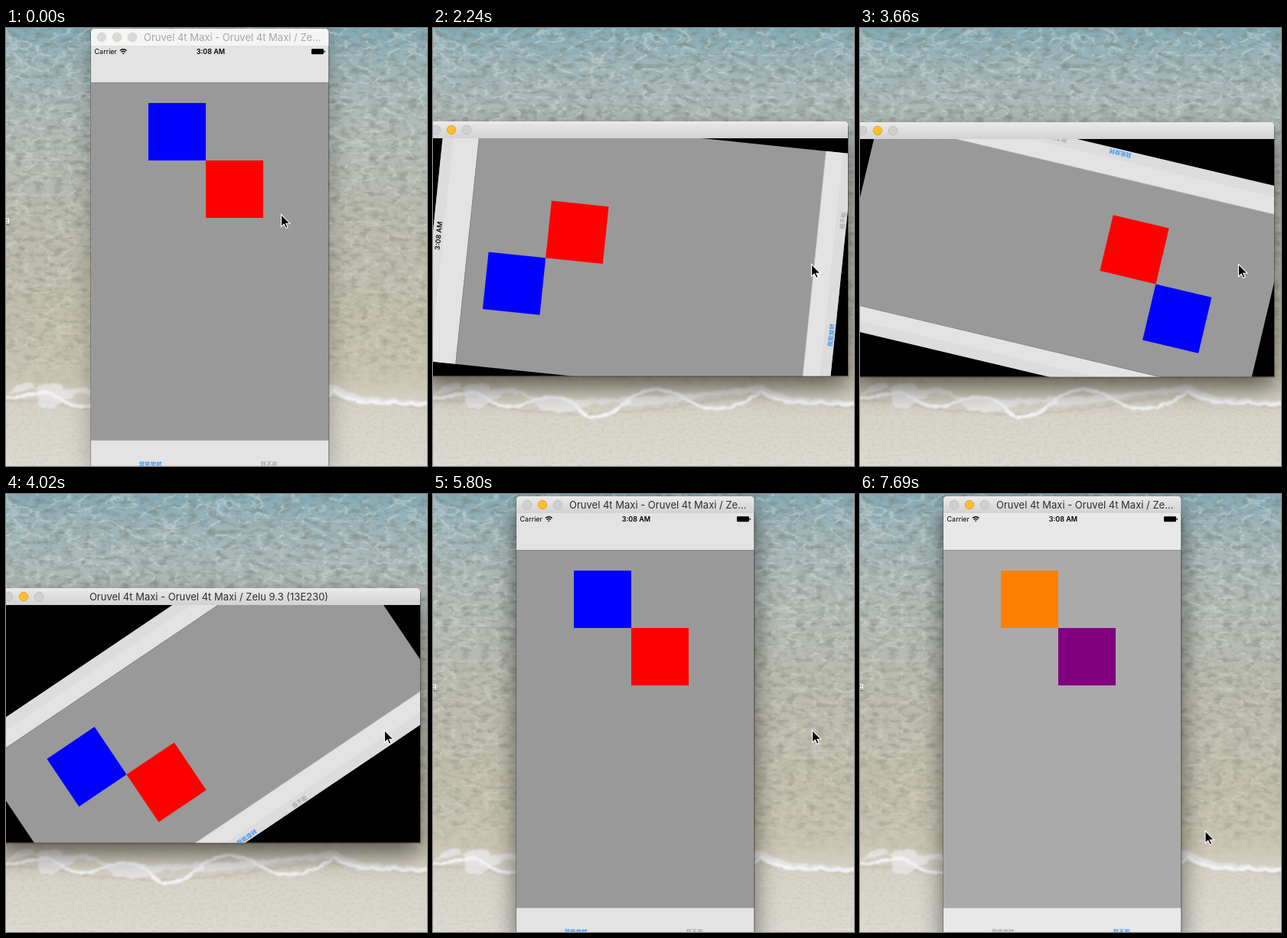
Animation of 550x572 px, one loop 8000 ms. Source, as an HTML page:

```html
<!DOCTYPE html>
<html lang="en">
<head>
<meta charset="utf-8">
<title>Simulator rotation</title>
<style>
  html, body { margin: 0; width: 100%; height: 100%; overflow: hidden; background: #c4c0b0; }
  svg { position: absolute; inset: 0; width: 100%; height: 100%; display: block; }
  #beach { will-change: transform; }
  text { font-family: Inter, "Noto Sans", sans-serif; }
  .status text { font-size: 9px; }
  .tab { font: 7.5px "Noto Sans CJK SC", "Noto Sans CJK", sans-serif; text-anchor: middle; }
</style>
</head>
<body>
<svg id="beach" viewBox="0 0 550 572">
  <defs>
    <linearGradient id="sea" x2="0" y2="1">
      <stop offset="0" stop-color="#84abb7"/>
      <stop offset=".08" stop-color="#9fb6ba"/>
      <stop offset=".2" stop-color="#b0bbb8"/>
      <stop offset=".42" stop-color="#bbbbaf"/>
      <stop offset=".65" stop-color="#c2beab"/>
      <stop offset=".8" stop-color="#cac5b2"/>
      <stop offset=".86" stop-color="#d6d2c6"/>
      <stop offset="1" stop-color="#dcdad2"/>
    </linearGradient>
    <linearGradient id="fade" x2="0" y2="1">
      <stop offset="0" stop-color="#fff"/>
      <stop offset=".35" stop-color="#ccc"/>
      <stop offset=".9" stop-color="#888"/>
      <stop offset="1" stop-color="#000"/>
    </linearGradient>
    <mask id="seaMask"><rect width="550" height="478" fill="url(#fade)"/></mask>
    <filter id="ripple" x="0" y="0" width="1" height="1" color-interpolation-filters="sRGB">
      <feTurbulence type="turbulence" baseFrequency=".036 .055" numOctaves="5" seed="8"/>
      <feColorMatrix values="0 0 0 0 .93  0 0 0 0 .95  0 0 0 0 .94  -3.4 0 0 0 .85"/>
    </filter>
    <filter id="mottle" x="0" y="0" width="1" height="1" color-interpolation-filters="sRGB">
      <feTurbulence type="fractalNoise" baseFrequency=".08 .15" numOctaves="4" seed="3"/>
      <feColorMatrix values="0 0 0 0 .47  0 0 0 0 .5  0 0 0 0 .46  2 0 0 0 -.85"/>
    </filter>
    <filter id="grain" x="0" y="0" width="1" height="1" color-interpolation-filters="sRGB">
      <feTurbulence type="fractalNoise" baseFrequency=".2 .3" numOctaves="2" seed="5"/>
      <feColorMatrix values="0 0 0 0 .6  0 0 0 0 .58  0 0 0 0 .54  1 0 0 0 -.42"/>
    </filter>
    <filter id="rough" x="-.1" y="-.5" width="1.2" height="2">
      <feTurbulence type="fractalNoise" baseFrequency=".08" numOctaves="3" seed="2"/>
      <feDisplacementMap in="SourceGraphic" scale="7" xChannelSelector="R" yChannelSelector="G"/>
      <feGaussianBlur stdDeviation=".9"/>
    </filter>
  </defs>
  <rect width="550" height="572" fill="url(#sea)"/>
  <g mask="url(#seaMask)">
    <rect width="550" height="478" filter="url(#mottle)" opacity=".75"/>
    <rect width="550" height="478" filter="url(#ripple)" opacity=".6"/>
  </g>
  <rect y="484" width="550" height="88" filter="url(#grain)" opacity=".35"/>
  <g filter="url(#rough)" fill="none">
    <path d="M-9 488Q40 484 75 493T190 503T330 492T430 483T560 498" stroke="#b9b2a2" stroke-width="3" opacity=".4"/>
    <path d="M-9 477Q15 478 42 468T75 473Q105 465 118 475T190 484T270 482T330 478T400 470T430 467Q455 482 480 483T560 489V494Q510 492 480 490T430 476Q390 476 330 486T250 491T190 498T130 488T75 488T40 478T-9 484Z" fill="#f0f1f5" fill-opacity=".6"/>
    <path d="M-9 483Q25 483 40 477T75 487T130 487T190 497T250 490T330 485T430 475Q450 489 480 489T560 493" stroke="#f3f4f8" stroke-width="4"/>
  </g>
  <g font-size="11">
    <text x="-1.5" y="255" fill="#000" opacity=".6">g</text>
    <text x="-1.8" y="254" fill="#fff" font-weight="600">g</text>
  </g>
</svg>

<svg id="stage" viewBox="0 0 550 572">
  <defs>
    <filter id="soft" filterUnits="userSpaceOnUse" x="-120" y="-120" width="800" height="860">
      <feGaussianBlur stdDeviation="16"/>
    </filter>
    <linearGradient id="bar" x2="0" y2="1">
      <stop offset="0" stop-color="#ebeaeb"/>
      <stop offset="1" stop-color="#d3d2d3"/>
    </linearGradient>
    <clipPath id="glass"><rect id="glassBox"/></clipPath>
  </defs>
  <rect id="shadow" filter="url(#soft)"/>
  <rect id="frame" fill="none" stroke="#000" stroke-opacity=".35"/>
  <path id="titleBar"/>
  <g id="lights" stroke-width=".8">
    <circle cx="14" cy="11" r="5.8"/><circle cx="34" cy="11" r="5.8"/><circle cx="54" cy="11" r="5.8"/>
  </g>
  <text id="title" font-size="13"></text>
  <g clip-path="url(#glass)">
    <rect id="back"/>
    <g id="ui">
      <rect id="page"/>
      <rect id="boxA" x="75" y="75" width="75" height="75"/>
      <rect id="boxB" x="150" y="150" width="75" height="75"/>
      <rect id="nav"/><rect id="navEdge" fill="#000" opacity=".03"/>
      <rect id="navLine" fill="#777" height=".6"/>
      <rect id="tabs"/><rect id="tabEdge" fill="#000" opacity=".03"/>
      <rect id="tabLine" fill="#a5a5a5" height=".5"/>
      <text class="tab" id="tabA">我能旋转</text>
      <text class="tab" id="tabB">我不能</text>
      <g class="status" id="status">
        <text x="4.5" y="11">Carrier</text>
        <g fill="none" stroke="#000" stroke-width="1.3">
          <path d="M38 6.6Q42.3 2.8 46.6 6.6M39.6 8.5Q42.3 6.2 45 8.5"/>
          <path d="M41.4 10.2H43.2" stroke-width="1.5"/>
        </g>
        <text id="clock" y="11" font-weight="600" text-anchor="middle">3:08 AM</text>
        <g id="battery">
          <rect y="4.3" width="16" height="7" rx="1.2"/>
          <rect x="16.6" y="6.6" width="1.2" height="2.4" rx=".6"/>
        </g>
      </g>
    </g>
  </g>
  <path id="cursor" d="M0 0V16L3.7 12.6L6.1 18L8.7 16.9L6.3 11.7H11.4Z" fill="#000" stroke="#fff" stroke-width="1.1"/>
</svg>

<script>
const LOOP = 8000, TICK = 118.1;
const SHORT = 310.5, LONG = 552, BAR = 22;
const NAME = "Oruvel 4t Maxi";
const LABEL = `${NAME} - ${NAME} / Zelu 9.3 (13E230)`;
const CUT_LABEL = `${NAME} - ${NAME} / Ze...`;

// Device poses, in ticks: spin goes from `angle` to 0, `tall` blends landscape (0) to portrait (1).
const POSES = [
  { at: 0,  x: 111, y: 1,   upright: true,  angle: 0,    tall: [1, 1], begin: 0,     span: 1 },
  { at: 19, x: -10, y: 122, upright: false, angle: -90,  tall: [1, 0], begin: 18.47, span: 3.39 },
  { at: 26, x: 110, y: 2,   upright: true,  angle: -90,  tall: [0, 0], begin: 99,    span: 1 },
  { at: 31, x: -11, y: 123, upright: false, angle: -180, tall: [0, 0], begin: 30.1,  span: 5.4 },
  { at: 39, x: 109, y: 3,   upright: true,  angle: -90,  tall: [0, 1], begin: 38.47, span: 3.39 }
];

// Pointer moves: start tick, end tick, from, control, to.
const MOVES = [
  [0, 6, [359.5, 243.5], [358, 275], [373, 302]],
  [7, 13, [373, 302], [430, 300], [494.5, 308.5]],
  [49, 54, [495.5, 308.5], [586, 420], [344, 554]],
  [59, 62, [344, 554], [346, 505], [353, 460]],
  [63, 65, [353, 460], [400, 445], [451, 440]]
];

const el = {};
document.querySelectorAll("#stage [id]").forEach(n => el[n.id] = n);
const set = (id, attrs) => {
  for (const k in attrs) el[id].setAttribute(k, attrs[k]);
};
const box = (id, x, y, width, height) => set(id, { x, y, width, height });
const clamp = u => Math.max(0, Math.min(1, u));
const ease = u => u * u * (3 - 2 * u);
const mix = (a, b, u) => a + (b - a) * u;

function drawWindow(pose, active, fresh) {
  const { x, y, upright } = pose;
  const w = upright ? SHORT : LONG, h = upright ? LONG : SHORT;
  box("shadow", x, y + (active ? 14 : 6), w, h + BAR);
  set("shadow", { opacity: active ? .55 : .28 });
  box("frame", x - .2, y + 6, w + .6, h + BAR - 5.5);
  set("titleBar", {
    d: `M${x} ${y + BAR}v-17q0 -5 5 -5h${w - 10}q5 0 5 5v17z`,
    fill: active ? "url(#bar)" : "#f5f5f5"
  });
  set("lights", {
    transform: `translate(${x} ${y})`,
    fill: active ? "#d0cfd0" : "#d9d9d6",
    stroke: active ? "#b9b8b9" : "#d0d0cd"
  });
  const amber = el.lights.children[1];
  amber.setAttribute("fill", active ? "#fdbd2e" : "#d9d9d6");
  amber.setAttribute("stroke", active ? "#dfa023" : "#d0d0cd");
  el.title.textContent = fresh ? "" : upright ? CUT_LABEL : LABEL;
  set("title", {
    x: upright ? x + 69 : x + w / 2, y: y + 15.7,
    "text-anchor": upright ? "start" : "middle",
    fill: active ? "#2e2e2e" : "#a6a6a6"
  });
  box("glassBox", x, y + BAR, w, h);
  box("back", x, y + BAR, w, h);
  return [x + w / 2, y + BAR + h / 2];
}

function drawUI(cx, cy, angle, tall, second) {
  const w = mix(LONG, SHORT, tall), h = mix(SHORT, LONG, tall);
  const navH = 33 + 15 * tall, tabH = 36.5;
  const gap = 41.5 + 36.1 * tall;
  const barFill = second ? "#e8e8e8" : "#e3e3e3";
  const edge = angle % 90 ? 14 : 0;
  set("ui", { transform: `translate(${cx} ${cy}) rotate(${angle}) translate(${-w / 2} ${-h / 2})` });
  box("page", 0, 0, w, h);
  set("page", { fill: second ? "#aaa" : "#999" });
  set("boxA", { fill: second ? "#ff8000" : "#00f" });
  set("boxB", { fill: second ? "#800080" : "#f00" });
  box("nav", 0, 0, w, navH);
  box("navEdge", 0, 0, w, edge);
  box("navLine", 0, navH, w, .6);
  box("tabs", 0, h - tabH, w, tabH);
  box("tabEdge", 0, h - 14, w, edge);
  box("tabLine", 0, h - tabH, w, .5);
  set("nav", { fill: barFill });
  set("tabs", { fill: barFill });
  set("tabA", { x: w / 2 - gap, y: h - 2, fill: second ? "#929292" : "#007aff" });
  set("tabB", { x: w / 2 + gap, y: h - 2, fill: second ? "#007aff" : "#929292" });
  set("status", { opacity: tall });
  set("clock", { x: w / 2 + 1.2 });
  set("battery", { transform: `translate(${w - 22.5} 0)` });
}

function drawCursor(k) {
  const [a, b, p, c, q] = MOVES.filter(m => k >= m[0]).pop();
  const u = ease(clamp((k - a) / (b - a))), v = 1 - u;
  const at = i => v * v * p[i] + 2 * u * v * c[i] + u * u * q[i];
  set("cursor", { transform: `translate(${at(0)} ${at(1)})` });
}

let last = -1;
function render(ms) {
  const k = Math.floor((ms % LOOP + 10) / TICK);
  if (k === last) return;
  last = k;
  const pose = POSES.filter(p => k >= p.at).pop();
  const u = ease(clamp((k - pose.begin) / pose.span));
  const [cx, cy] = drawWindow(pose, k >= 8, pose.at > 0 && k === pose.at);
  drawUI(cx, cy, pose.angle * (1 - u), mix(...pose.tall, u), k >= 56);
  drawCursor(k);
}

const start = performance.now();
function loop() {
  render(performance.now() - start);
  requestAnimationFrame(loop);
}
loop();
</script>
</body>
</html>
```
